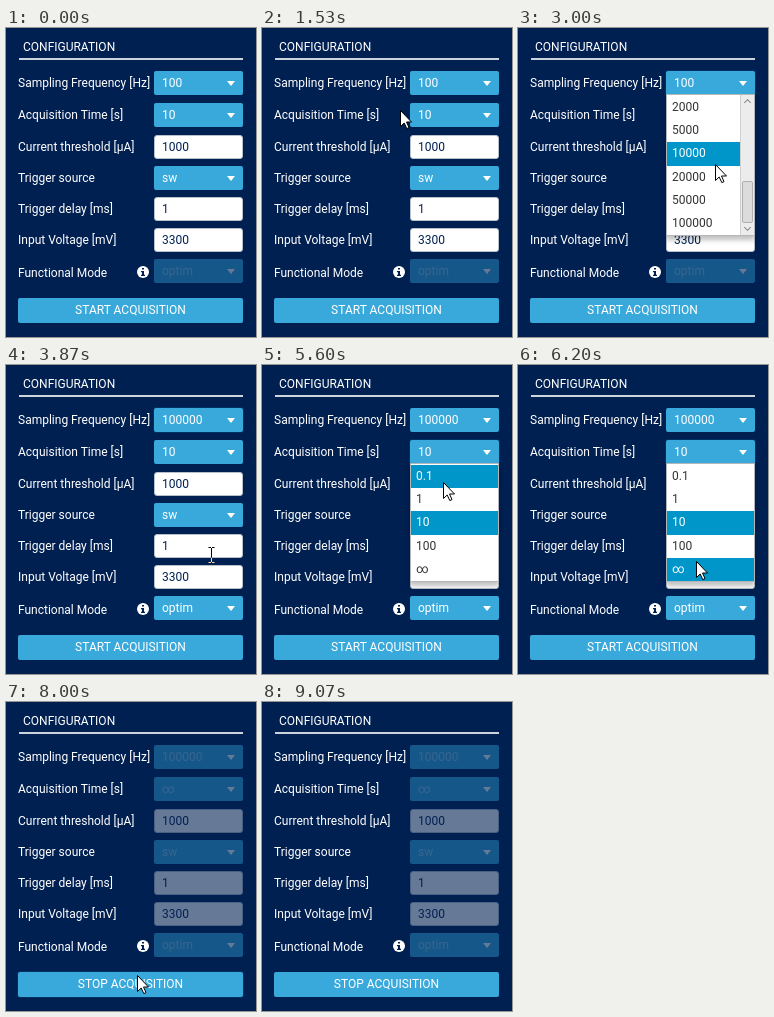
An HTML page that plays this animation: 250 by 309 pixels, repeating every 9.27 s.

```html
<!DOCTYPE html>
<html lang="en">
<head>
<meta charset="utf-8">
<title>Configuration panel</title>
<style>
  html, body { margin: 0; width: 100%; height: 100%; overflow: hidden; background: #002052; }
  #stage {
    position: relative; width: 250px; height: 309px; overflow: hidden; isolation: isolate;
    background: #002052; color: #fff; font: 12px/16px Roboto, Arial, sans-serif; white-space: pre;
  }
  #stage div, #stage svg { position: absolute; box-sizing: border-box; }
  .label { left: 12px; }
  .title { left: 17px; top: 11px; }
  .rule { left: 13px; top: 30px; width: 224px; height: 2px; background: #ccd4de; }
  .box { left: 148px; width: 89px; height: 24px; border-radius: 2px; }
  .select { padding-left: 8px; line-height: 24px; background: #39a9dc; }
  .field {
    padding-left: 7px; line-height: 22px; background: #fff; color: #002052;
    border: 1px solid #b8c0cc; border-radius: 3px;
  }
  .arrow { left: 73px; top: 10px; border: solid transparent; border-width: 5px 4.5px 0; border-top-color: #fff; }
  .off, .select.off span { opacity: .4; }
  .focus { box-shadow: 0 0 0 1px #039ed322; }
  #button {
    left: 12px; top: 270px; width: 225px; height: 25px; border-radius: 2px; background: #39a9dc;
    line-height: 25px; text-align: center;
  }
  .popup {
    left: 148px; width: 89px; background: #fff; border: 1px solid #b4b8bc;
    box-shadow: 0 4px 5px rgba(0, 0, 0, .25); color: #333;
  }
  .item { left: 0; width: 100%; height: 23.2px; line-height: 23.2px; padding-left: 5px; }
  .item.on { background: #0096c9; color: #fff; }
  .bar { right: 0; top: 0; width: 14px; height: 100%; background: #ececec; border-left: 1px solid #d0d0d0; }
  .thumb { left: 1px; width: 11px; height: 42px; background: #dcdcdc; border: 1px solid #b0b0b0; border-radius: 2px; }
  .up, .down {
    left: 4px; width: 5px; height: 5px; border: solid #888; border-width: 1px 0 0 1px; transform: rotate(45deg);
  }
  .up { top: 5px; }
  .down { bottom: 5px; transform: rotate(225deg); }
  #pointer, #ibeam { left: 0; top: 0; }
  #ibeam { mix-blend-mode: difference; }
</style>
</head>
<body>
<div id="stage">
  <div class="title">CONFIGURATION</div>
  <div class="rule"></div>
  <svg style="left:130px;top:237px" width="14" height="14">
    <circle cx="7" cy="7" r="6" fill="#fff"/>
    <path d="M6 3h2v1.6H6zM5 6h3v3.8h1V11H5V9.8h1V7.2H5z" fill="#002052"/>
  </svg>
  <div id="button"></div>
</div>
<script>
const LOOP = 9270, TICK = 200 / 3, ROW = 23.2;
const stage = document.getElementById('stage');
const button = document.getElementById('button');

function add(parent, cls, text = '', top) {
  const el = document.createElement('div');
  el.className = cls;
  el.textContent = text;
  if (top !== undefined) el.style.top = top + 'px';
  parent.append(el);
  return el;
}

// label, label top, control top, control type, value
const controls = [
  ['Sampling Frequency [Hz]', 47, 43, 'select', '100'],
  ['Acquisition Time [s]', 79, 75, 'select', '10'],
  ['Current threshold [µA]', 111, 107, 'field', '1000'],
  ['Trigger source', 142, 138, 'select', 'sw'],
  ['Trigger delay [ms]', 173, 169, 'field', '1'],
  ['Input Voltage [mV]', 204, 200, 'field', '3300'],
  ['Functional Mode', 237, 231, 'select', 'optim']
].map(([label, labelTop, top, type, value]) => {
  add(stage, 'label', label, labelTop);
  const box = add(stage, 'box ' + type, '', top);
  const text = document.createElement('span');
  text.textContent = value;
  box.append(text);
  if (type === 'select') add(box, 'arrow');
  return { box, text, top, type };
});

function makePopup(top, count, scrolls) {
  const el = add(stage, 'popup', '', top);
  el.style.height = Math.round(count * ROW) + 3 + 'px';
  const items = Array.from({ length: count }, (_, i) => add(el, 'item', '', 1 + i * ROW));
  let thumb;
  if (scrolls) {
    const bar = add(el, 'bar');
    add(bar, 'up');
    add(bar, 'down');
    thumb = add(bar, 'thumb');
  }
  return { el, top, items, thumb };
}

const rates = [];
for (let p = 1; p < 1e5; p *= 10) rates.push(p, 2 * p, 5 * p);
rates.push(1e5);
const times = ['0.1', '1', '10', '100', '∞'];
const ratePopup = makePopup(66, 6, true);
const timePopup = makePopup(98, 5, false);

stage.insertAdjacentHTML('beforeend', `
  <svg id="pointer" width="13" height="20">
    <path d="M.5.5V16.5L4.2 13 6.8 18.6 9 17.6 6.5 12H11.5Z" fill="#fff" stroke="#000"/>
  </svg>
  <svg id="ibeam" width="8" height="16">
    <path d="M.5.5H3M4 .5H6.5M3.5 1V15M.5 15.5H3M4 15.5H6.5" fill="none" stroke="#fff"/>
  </svg>`);
const pointer = document.getElementById('pointer');
const ibeam = document.getElementById('ibeam');

// time, x, y of the pointer tip
const path = [
  [600, 222, 380], [800, 216, 300], [1330, 133, 112], [1530, 138, 82], [1670, 153, 67], [1870, 157, 55],
  [2000, 157, 55], [2400, 188, 112], [3000, 197, 136], [3530, 205, 190],
  [4270, 205, 190], [5000, 168, 82], [5470, 168, 82], [5600, 181, 117], [6330, 178, 200],
  [6930, 178, 200], [7200, 149, 256], [7730, 131, 273], [8200, 131, 273], [8530, 104, 312], [8660, 96, 345]
];

const slope = (i, axis) => (path[i + 1][axis] - path[i][axis]) / (path[i + 1][0] - path[i][0]);

// Speed through a point: smooth along a run, zero at rests and turns.
function speed(i, axis) {
  if (i === 0 || i === path.length - 1) return 0;
  const a = slope(i - 1, axis), b = slope(i, axis);
  return a * b > 0 ? 2 * a * b / (a + b) : 0;
}

function pointerAt(t) {
  const i = path.findIndex(k => k[0] > t) - 1;
  if (i < 0) return [218, 380];
  const dt = path[i + 1][0] - path[i][0], k = (t - path[i][0]) / dt;
  const ease = k * k * (3 - 2 * k);
  return [1, 2].map(axis => Math.round(
    path[i][axis] * (1 - ease) + path[i + 1][axis] * ease +
    dt * k * (1 - k) * (speed(i, axis) * (1 - k) - speed(i + 1, axis) * k)));
}

function place(el, x, y, visible) {
  el.style.transform = `translate(${x}px, ${y}px)`;
  el.style.visibility = visible ? 'visible' : 'hidden';
}

function showPopup(popup, open, list, first, selected, y) {
  popup.el.style.display = open ? '' : 'none';
  const hover = Math.floor((y - popup.top - 2) / ROW);
  popup.items.forEach((el, i) => {
    el.textContent = list[first + i];
    el.classList.toggle('on', i === hover || first + i === selected);
  });
}

function render(now) {
  const tick = Math.floor((now % LOOP + 5) / TICK);
  const t = Math.round(tick * TICK / 10) * 10;
  const between = (a, b) => t >= a && t < b;
  const [x, y] = pointerAt(t);
  const rateOpen = between(2070, 3870), timeOpen = between(5270, 6730);
  const running = t >= 8000;

  controls[0].text.textContent = t < 3730 ? '100' : '100000';
  controls[1].text.textContent = t < 6600 ? '10' : '∞';
  controls.forEach((c, i) => c.box.classList.toggle('off', running || (i === 6 && t < 3730)));
  controls[0].box.classList.toggle('focus', between(2070, 5270));
  controls[1].box.classList.toggle('focus', between(5270, 7800));
  button.classList.toggle('focus', between(7800, 9070));
  button.textContent = (t < 7930 ? 'START' : 'STOP') + ' ACQUISITION';

  const first = 6 + Math.max(0, Math.min(4, Math.floor((t - 2400) / 100)));
  showPopup(ratePopup, rateOpen, rates, first, t < 3730 ? 6 : 15, y);
  ratePopup.thumb.style.top = 12 + first * 7.4 + 'px';
  showPopup(timePopup, timeOpen, times, 0, t < 6600 ? 2 : 4, y);

  const overField = !rateOpen && !timeOpen && !running && x >= 148 && x < 237 &&
    controls.some(c => c.type === 'field' && y >= c.top && y < c.top + 24);
  place(pointer, x, y, !overField);
  place(ibeam, x - 3, y - 8, overField);
}

const start = performance.now();
(function frame() {
  render(performance.now() - start);
  requestAnimationFrame(frame);
})();
</script>
</body>
</html>
```
